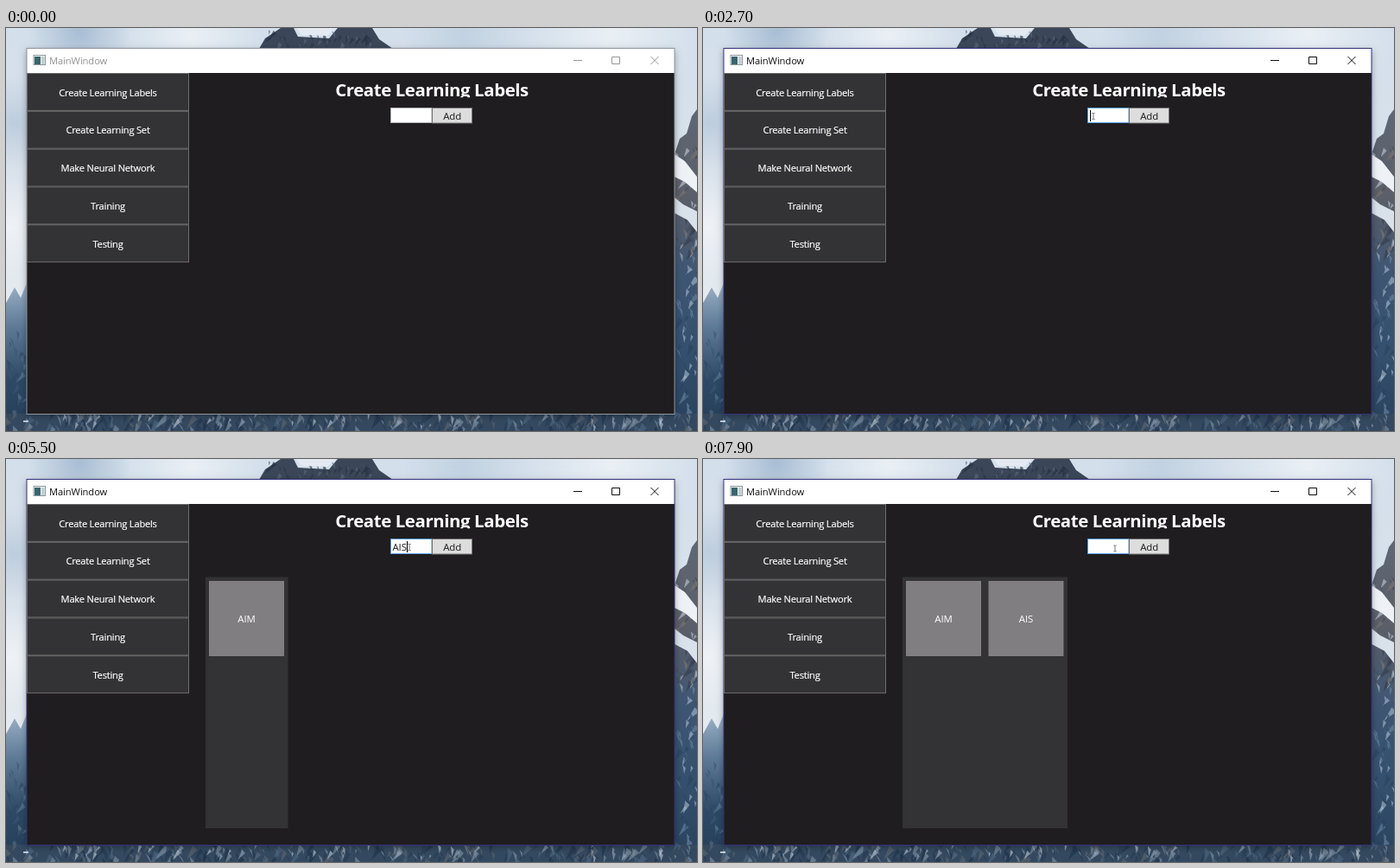
An HTML page with a canvas that plays this animation: 800x466 px, repeating every 8000 ms.

```html
<!DOCTYPE html>
<html lang="en">
<head>
<meta charset="utf-8">
<title>Learning labels</title>
<style>
  html, body { margin: 0; width: 100%; height: 100%; overflow: hidden; background: #1f1d1f; }
  #backdrop, #stage { position: absolute; left: 0; top: 0; width: 800px; height: 466px; }
  text { font: 11.4px "Open Sans", "Noto Sans", sans-serif; fill: #fff; letter-spacing: -.1px; }
  .mid { text-anchor: middle; }
  .dark { fill: #1c1c1c; }
  #menu text { font-size: 11.1px; letter-spacing: -.2px; stroke: #fff; stroke-width: .2px; }
  #caption { font-size: 11.2px; }
  #heading { font-size: 20.4px; font-weight: 700; letter-spacing: -.4px; }
  #controls { fill: none; stroke-width: 1; }
</style>
</head>
<body>
<canvas id="backdrop" width="800" height="466"></canvas>
<svg id="stage" viewBox="0 0 800 466">
  <rect x="24" y="23.5" width="750" height="423" fill="#1f1d1f"/>
  <rect x="24" y="23.5" width="750" height="28.5" fill="#fff"/>
  <rect id="frame" x="24" y="23.5" width="750" height="423" fill="none"/>

  <rect x="32" y="31.5" width="13.5" height="11" fill="#f4f6f7" stroke="#8d979c"/>
  <rect x="33" y="33" width="7" height="9" fill="#39666f"/>
  <rect x="41" y="33" width="3.5" height="9" fill="#c3cdd1"/>
  <text id="caption" x="50" y="42">MainWindow</text>
  <path id="controls" d="M657 37.5h10 M701.5 33.5h9v8h-9z M746.5 33l9 9m0-9l-9 9"/>

  <g id="menu"></g>

  <clipPath id="headClip"><rect x="370" y="56" width="250" height="24.3"/></clipPath>
  <text id="heading" class="mid" x="493" y="79.3" clip-path="url(#headClip)">Create Learning Labels</text>

  <rect id="field" x="445.5" y="92.5" width="47.5" height="17" fill="#fff"/>
  <text id="typed" class="dark" x="447.5" y="106"></text>
  <path id="caret" stroke="#000" fill="none"/>
  <rect id="add" x="493.5" y="92.5" width="46" height="17.5"/>
  <text class="mid dark" x="516.7" y="106">Add</text>

  <rect id="panel" x="231" y="136.5" height="290.5" fill="#333234"/>
  <g id="tiles"></g>

  <path id="arrow" d="M0 0v7.6l1.8-1.6 1.2 2.7 1.3-.6-1.2-2.6h2.3z" fill="#fff" stroke="#222" stroke-width=".5"/>
  <path id="beam" d="M-1.7-3.5h1.3l.4.4.4-.4h1.3M0-3.1v6.2M-1.7 3.5h1.3l.4-.4.4.4h1.3" fill="none" stroke="#555" stroke-width=".8"/>
</svg>
<script>
const LOOP = 8000, STEP = 100;
const $ = id => document.getElementById(id);
const set = (el, attrs) => { for (const k in attrs) el.setAttribute(k, attrs[k]); return el; };
const make = (parent, tag, attrs, text = '') => {
  const el = set(document.createElementNS('http://www.w3.org/2000/svg', tag), attrs);
  el.textContent = text;
  return parent.appendChild(el);
};
const show = (el, on) => el.setAttribute('visibility', on ? 'visible' : 'hidden');

// Mountain backdrop
function paintBackdrop() {
  const c = $('backdrop').getContext('2d');
  let seed = 11;
  const rnd = (a = 0, b = 1) => {
    seed = (seed * 16807) % 2147483647;
    return a + (b - a) * seed / 2147483647;
  };
  const poly = (fill, points) => {
    c.fillStyle = fill;
    c.beginPath();
    for (let i = 0; i < points.length; i += 2) c.lineTo(points[i], points[i + 1]);
    c.fill();
  };
  const fade = (y0, y1, ...colors) => {
    const g = c.createLinearGradient(0, y0, 0, y1);
    colors.forEach((color, i) => g.addColorStop(i / (colors.length - 1), color));
    return g;
  };
  const glow = (x, y, r, rgb, alpha) => {
    const g = c.createRadialGradient(x, y, 0, x, y, r);
    g.addColorStop(0, `rgba(${rgb},${alpha})`);
    g.addColorStop(1, `rgba(${rgb},0)`);
    c.fillStyle = g;
    c.fillRect(x - r, y - r, 2 * r, 2 * r);
  };
  const facets = (n, x, y, w, h, size, colors) => {
    c.globalAlpha = .65;
    for (let i = 0; i < n; i++) {
      const px = rnd(x, x + w), py = rnd(y, y + h), s = rnd(size * .4, size), lean = rnd(-s, s);
      poly(colors[i % colors.length], [px, py, px + s * .5, py + s * .5, px + lean, py + s * 1.5]);
    }
    c.globalAlpha = 1;
  };

  c.fillStyle = fade(0, 466, '#d3dfeb', '#d9e2ec', '#e4eaf0', '#c3cfdc');
  c.fillRect(0, 0, 800, 466);
  glow(85, 4, 60, '132,162,192', .55);
  glow(215, 8, 80, '236,241,246', .9);
  glow(530, 8, 70, '176,196,216', .5);
  glow(700, 6, 100, '236,241,246', .9);
  glow(8, 110, 55, '172,192,213', .6);
  glow(5, 230, 60, '240,243,247', .9);

  // twin peaks behind the title bar
  poly('#3b4758', [293, 24, 300, 12, 318, 0, 333, 0, 338, 10, 374, 12, 384, 0, 424, 0, 432, 13, 448, 24]);
  facets(40, 304, 2, 118, 18, 8, ['#232f40', '#5b6b80', '#2c3849']);
  poly('#e3eaf1', [336, 0, 382, 0, 372, 9, 342, 8]);

  poly(fade(285, 466, '#a9bccf', '#5d7a97', '#2e4a66', '#243c56'), [0, 318, 10, 300, 17, 312, 26, 290, 26, 466, 0, 466]);
  facets(40, 0, 350, 24, 100, 10, ['#2c4662', '#5d7690', '#3a5672']);

  poly(fade(100, 466, '#5e6774', '#5b5f68', '#3f5673', '#34506e', '#29415c'),
    [774, 146, 780, 128, 788, 122, 794, 102, 800, 94, 800, 466, 774, 466]);
  facets(40, 774, 130, 26, 130, 9, ['#353c48', '#7a736f', '#454d5a', '#bcc5cf']);
  poly('#eef2f6', [774, 146, 786, 154, 800, 172, 800, 190, 786, 178, 774, 172]);
  poly('#d9e2eb', [774, 196, 784, 204, 800, 212, 800, 236, 789, 222, 774, 214]);
  facets(60, 774, 245, 26, 200, 11, ['#2a4460', '#6683a0', '#38536f', '#a3b6c8']);

  poly('#34495f', [0, 446, 800, 446, 800, 466, 0, 466]);
  facets(260, 0, 442, 800, 20, 12, ['#1e334b', '#4c6580', '#263c54', '#7d8fa2', '#5b646e']);
  facets(60, 60, 444, 720, 14, 8, ['#b7c3cf', '#93a5b8']);
  c.fillStyle = '#e6ebf0';
  c.fillRect(20, 454, 6, 1.5);

  // window shadow
  c.shadowColor = 'rgba(0,0,0,.35)';
  c.shadowBlur = 8;
  c.shadowOffsetY = 2;
  c.fillStyle = '#1f1d1f';
  c.fillRect(24, 24, 750, 422);
}

['Create Learning Labels', 'Create Learning Set', 'Make Neural Network', 'Training', 'Testing'].forEach((name, i) => {
  const y = 52 + i * 43.8;
  make($('menu'), 'rect', { x: 24.5, y: y + .5, width: 187, height: 42.9, fill: '#333234', stroke: '#6d6d6d' });
  make($('menu'), 'text', { x: 118, y: y + 26.6, class: 'mid' }, name);
});
const tiles = ['AIM', 'AIS'].map((name, i) => {
  const g = make($('tiles'), 'g', {}), x = 235.5 + i * 95.5;
  make(g, 'rect', { x, y: 141.5, width: 86, height: 86, fill: '#807e80', stroke: '#8d8b8d', 'stroke-width': .8 });
  make(g, 'text', { x: x + 43, y: 189.3, class: 'mid' }, name);
  return g;
});

// [time, x, y] of the pointer's hot spot
const path = [
  [600, 535, 440], [1100, 475, 113], [1400, 475, 113], [1700, 452, 102], [3300, 452, 102], [3700, 513, 105],
  [4000, 513, 105], [4300, 467, 102], [6000, 467, 102], [6300, 505, 97], [6800, 505, 97], [7100, 477, 103.5], [LOOP, 477, 103.5]
];
const typing = [[0, ''], [3100, 'A'], [3200, 'AI'], [3300, 'AIM'], [3900, ''], [5200, 'A'], [5300, 'AI'], [5500, 'AIS'], [6600, '']];
const focus = [[0, false], [1700, true], [3900, false], [4400, true], [6500, false], [7300, true]];
const caretOn = [[0, false], [1700, true], [2300, false], [2700, true], [3900, false], [4400, true], [4900, false], [5200, true], [6000, false], [7400, true], [7900, false]];
const count = [[0, 0], [3900, 1], [6600, 2]];
const pressed = [[0, false], [3800, true], [3900, false], [6500, true], [6600, false]];

const at = (table, t) => table.filter(row => row[0] <= t).pop()[1];
function pointer(t) {
  const i = path.findIndex(p => p[0] > t);
  if (i < 1) return null;
  const a = path[i - 1], b = path[i];
  const u = (t - a[0]) / (b[0] - a[0]), e = u * u * (3 - 2 * u);
  return [a[1] + (b[1] - a[1]) * e, a[2] + (b[2] - a[2]) * e];
}

function draw(t) {
  const pos = pointer(t), active = t >= 1700, focused = at(focus, t);
  const inRow = pos && pos[1] > 92 && pos[1] < 111;
  const onField = inRow && pos[0] > 445 && pos[0] < 493;
  const onAdd = inRow && pos[0] >= 493 && pos[0] < 540;

  set($('frame'), { stroke: active ? '#34327c' : '#8f959c' });
  $('caption').style.fill = active ? '#111' : '#929292';
  set($('controls'), { stroke: active ? '#111' : '#999' });

  set($('field'), { stroke: focused ? '#569de5' : onField ? '#7eb4ea' : '#abadb3' });
  const text = at(typing, t);
  $('typed').textContent = text;
  const end = 448.5 + (text ? $('typed').getComputedTextLength() : 0);
  set($('caret'), { d: `M${Math.floor(end) + .5} 95v13` });
  show($('caret'), at(caretOn, t));

  set($('add'), {
    fill: at(pressed, t) ? '#c4e5f6' : onAdd ? '#bee6fd' : '#ddd',
    stroke: onAdd ? '#3c7fb1' : '#707070'
  });

  const n = at(count, t);
  set($('panel'), { width: n * 95.5 });
  tiles.forEach((tile, i) => show(tile, i < n));

  show($('arrow'), pos && !onField);
  show($('beam'), onField);
  if (pos) set(onField ? $('beam') : $('arrow'), { transform: `translate(${pos[0]} ${pos[1]})` });
}

paintBackdrop();
const start = performance.now();
function tick() {
  const t = (performance.now() - start) % LOOP;
  draw(Math.floor(t / STEP) * STEP);
  requestAnimationFrame(tick);
}
tick();
</script>
</body>
</html>
```
